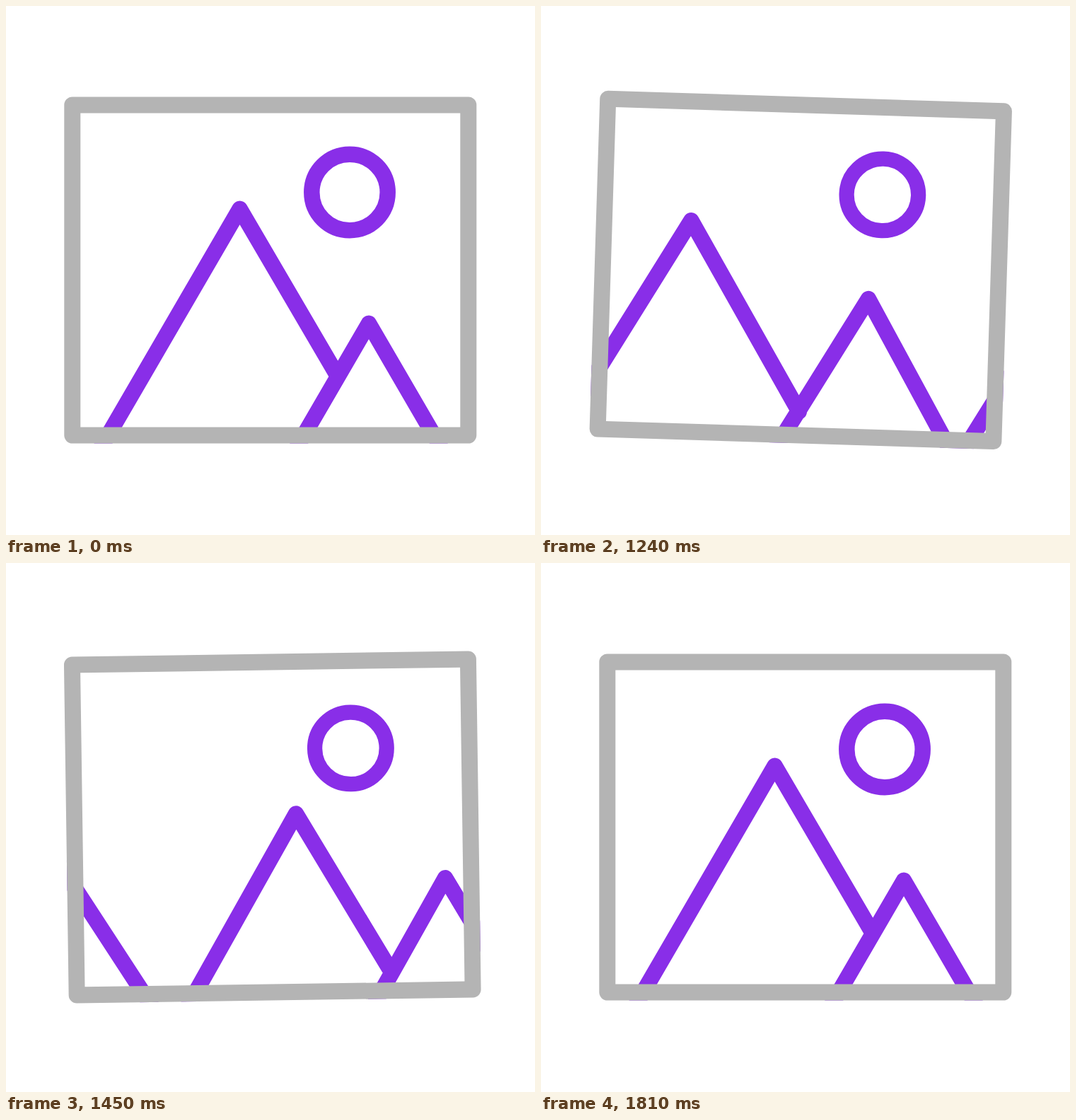
Recreate the animation shown at these times as an HTML page. Size 748x748 px, loop 1.84 s.

```html
<!DOCTYPE html>
<html lang="en">
<head>
<meta charset="utf-8">
<title>Picture icon</title>
<style>
  html, body { margin: 0; width: 100%; height: 100%; overflow: hidden; background: #fff; }
  svg { display: block; width: 100%; height: 100%; }
  .ink { fill: none; stroke: #892ee8; stroke-width: 22.5; stroke-linecap: round; stroke-linejoin: round; }
  .frame { fill: none; stroke: #b4b4b4; stroke-width: 23; stroke-linejoin: round; }
</style>
</head>
<body>
<svg viewBox="0 0 748 748">
  <clipPath id="canvas"><rect x="82.3" y="128.5" width="583" height="490" rx="11.5"/></clipPath>
  <g id="picture">
    <g clip-path="url(#canvas)">
      <path id="ridge" class="ink"/>
      <g id="sun"><circle class="ink" r="53.7"/></g>
    </g>
    <rect class="frame" x="93.8" y="140" width="560" height="467"/>
  </g>
</svg>
<script>
const LOOP = 1840, HOLD = 1030, STEP = 30, START = 995, END = 1805;
const SLOPE = 1.72, GROUND = 690;
const [picture, ridge, sun] = ['picture', 'ridge', 'sun'].map(id => document.getElementById(id));

// Smooth curve through [time, value] points that never overshoots them.
function curve(...points) {
  const rise = i => (points[i + 1][1] - points[i][1]) / (points[i + 1][0] - points[i][0]);
  const tangents = points.map((_, i) => {
    if (i === 0 || i === points.length - 1) return 0;
    const a = rise(i - 1), b = rise(i);
    return a * b > 0 ? 2 * a * b / (a + b) : 0;
  });
  return t => {
    if (t <= points[0][0]) return points[0][1];
    const next = points.findIndex(p => p[0] > t);
    if (next < 0) return points[points.length - 1][1];
    const i = next - 1, [t0, v0] = points[i], [t1, v1] = points[next];
    const d = t1 - t0, u = (t - t0) / d, w = 1 - u;
    return v0 * (1 + 2 * u) * w * w + v1 * u * u * (3 - 2 * u)
      + d * u * w * (tangents[i] * w - tangents[next] * u);
  };
}

const tilt = curve([1000, 0], [1030, 0.14], [1210, 2], [1240, 1.79], [1330, 0.03],
  [1400, -1.48], [1450, -0.82], [1560, 0.44], [1810, 0]);
const sunScale = curve([1000, 1], [1030, 0.997], [1240, 0.945], [1345, 0.925],
  [1450, 0.946], [1570, 0.985], [1720, 1]);
const middleShift = curve([1000, 0], [1030, 0.01], [1240, 0.232], [1330, 0.362],
  [1450, 0.579], [1570, 0.784], [1810, 1]);

function outerShift(t) {
  const u = Math.min(1, Math.max(0, (t - START) / (END - START)));
  return t < HOLD ? 0 : u * u * (3 - 2 * u);
}

const mix = (a, b, p) => a + (b - a) * p;

function mountain(x, y, endX = x + (GROUND - y) / SLOPE, endY = GROUND) {
  return `M${x - (GROUND - y) / SLOPE} ${GROUND}L${x} ${y}L${endX} ${endY}`;
}

// Each mountain slides one place to the left: out, small to large, in from the right.
function draw(t) {
  const p = outerShift(t), m = middleShift(t);
  const leaving = p < 1 ? mountain(330.5 - 519 * p, 286.8 + 98 * p, 467 - 408 * p, 520 + 245 * p) : '';
  const middle = mountain(mix(513, 330.5, m), mix(448.8, 286.8, m), mix(630, 467, m), mix(650, 520, m));
  const entering = p > 0 ? mountain(mix(768, 513, p), 448.8) : '';
  ridge.setAttribute('d', leaving + middle + entering);
  sun.setAttribute('transform', `translate(486 263.5) scale(${sunScale(t)})`);
  picture.setAttribute('transform', `rotate(${tilt(t)} 374 165)`);
}

const begin = performance.now();
function tick() {
  const t = (performance.now() - begin) % LOOP;
  draw(t < HOLD ? 0 : HOLD + Math.floor((t - HOLD) / STEP) * STEP);
  requestAnimationFrame(tick);
}
tick();
</script>
</body>
</html>
```
